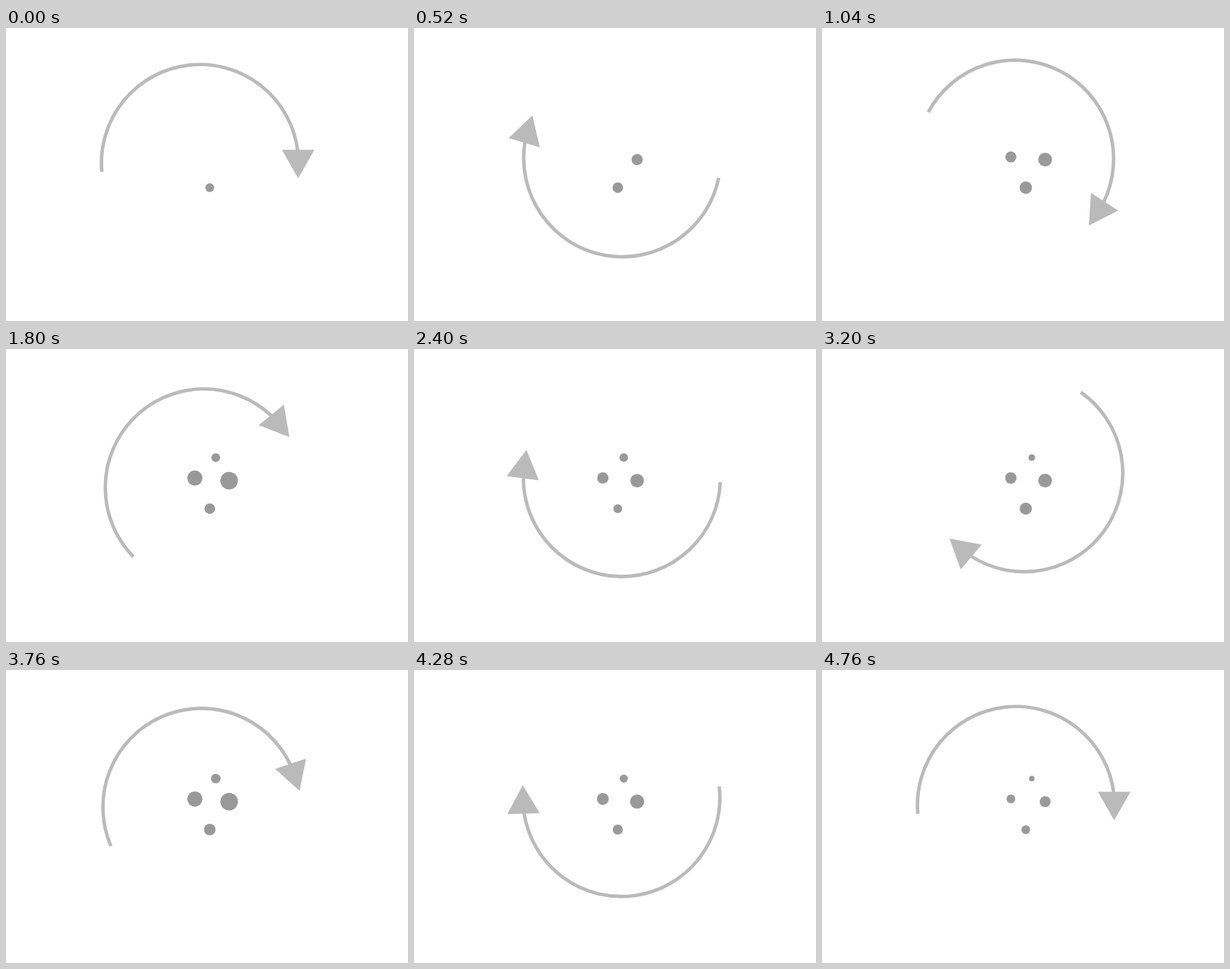
An HTML page for the animation above (4800 ms loop, 550 by 400 pixels).

```html
<!DOCTYPE html>
<html lang="en">
<head>
<meta charset="utf-8">
<title>Spinning arrow</title>
<style>
  html, body { margin: 0; width: 100%; height: 100%; overflow: hidden; background: #fff; }
  svg { display: block; width: 100%; height: 100%; }
</style>
</head>
<body>
<svg id="stage" viewBox="0 0 550 400">
  <g id="arrow" fill="#bababa">
    <path id="arc" fill="none" stroke="#bababa" stroke-width="4.7"/>
    <path d="M377.5 166.3H422L399.8 205.3Z"/>
  </g>
</svg>
<script>
  const STEP = 40, FRAMES = 120, LAST = FRAMES - 1, TURNS = 5;
  const PIVOT = [274.6, 179.6];
  const RING = { x: 265.4, y: 184.7, r: 134.8, from: 175, to: 352.5 };

  // keys: appear, widest, narrowest, widest, narrowest
  const dots = [
    { x: 278.8, y: 217.9, low: 6, high: 8.7, keys: [0, 28, 60, 84, LAST] },
    { x: 258.4, y: 176.1, low: 6, high: 10.4, keys: [16, 45, 70, 94, LAST] },
    { x: 305.3, y: 179.7, low: 7.5, high: 12, keys: [12, 45, 70, 94, LAST] },
    { x: 287, y: 148.2, low: 3.8, high: 7, keys: [30, 52, 75, 97, LAST] }
  ];

  const stage = document.getElementById('stage');
  const arrow = document.getElementById('arrow');

  function ringPoint(deg) {
    const a = deg * Math.PI / 180;
    return (RING.x + RING.r * Math.cos(a)).toFixed(2) + ' ' +
           (RING.y + RING.r * Math.sin(a)).toFixed(2);
  }

  document.getElementById('arc').setAttribute('d',
    `M${ringPoint(RING.from)}A${RING.r} ${RING.r} 0 0 1 ${ringPoint(RING.to)}`);

  for (const dot of dots) {
    dot.el = document.createElementNS(stage.namespaceURI, 'circle');
    dot.el.setAttribute('cx', dot.x);
    dot.el.setAttribute('cy', dot.y);
    dot.el.setAttribute('fill', '#999');
    stage.appendChild(dot.el);
  }

  function radius({ low, high, keys }, n) {
    if (n < keys[0]) return 0;
    let i = 0;
    while (i < keys.length - 2 && n >= keys[i + 1]) i++;
    const p = (n - keys[i]) / (keys[i + 1] - keys[i]);
    return low + (high - low) * (i % 2 ? 1 - p : p);
  }

  function draw(ms) {
    const n = Math.floor(ms / STEP) % FRAMES;
    const angle = 360 * TURNS * n / LAST;
    arrow.setAttribute('transform', `rotate(${angle} ${PIVOT})`);
    for (const dot of dots) dot.el.setAttribute('r', radius(dot, n));
  }

  const start = performance.now();
  function tick() {
    draw(performance.now() - start);
    requestAnimationFrame(tick);
  }
  tick();
</script>
</body>
</html>
```
